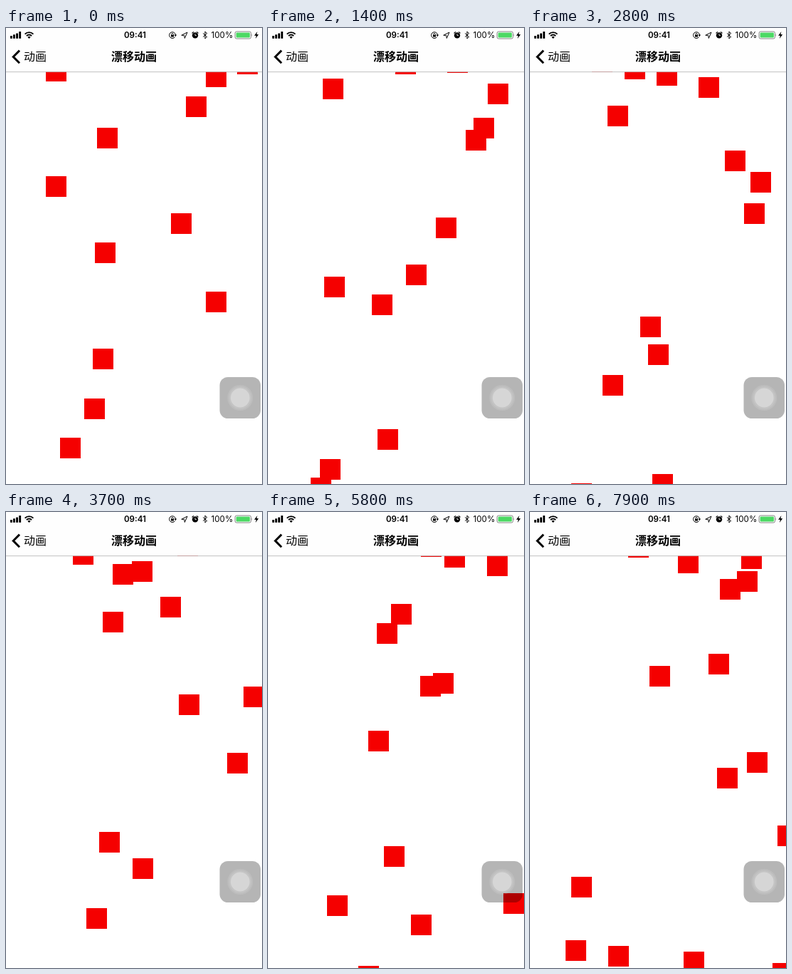
An HTML page that plays this animation: 360 by 640 pixels, repeating every 8000 ms.

```html
<!DOCTYPE html>
<html lang="zh">
<head>
<meta charset="utf-8">
<title>漂移动画</title>
<style>
html, body { margin: 0; width: 100%; height: 100%; overflow: hidden; background: #fff; }
svg { display: block; width: 360px; height: 640px; }
.cjk { font: 16px "Noto Sans CJK SC", "Noto Sans CJK", sans-serif; }
.status { font: 11.6px Inter, "Liberation Sans", sans-serif; }
.title { font-weight: 700; }
.clock { font-weight: 600; }
</style>
</head>
<body>
<svg viewBox="0 0 360 640" xmlns="http://www.w3.org/2000/svg">
  <rect width="360" height="640" fill="#fff"/>
  <g id="drift" fill="#f50000"></g>

  <!-- floating button -->
  <rect x="300.5" y="490" width="57.5" height="58" rx="11.5" fill="#000" fill-opacity=".29"/>
  <g fill="#fff" transform="translate(329.3 519)">
    <circle r="18" fill-opacity=".1"/>
    <circle r="15.8" fill-opacity=".1"/>
    <circle r="13.4" fill-opacity=".3"/>
  </g>

  <!-- navigation bar -->
  <rect width="360" height="61.5" fill="#fefefe"/>
  <rect y="61.3" width="360" height=".8" fill="#b4b4b4"/>
  <path d="M19 31.6 10.2 40.4 19 49.2" fill="none" stroke="#000" stroke-width="2.9"/>
  <text class="cjk" x="25" y="46.4">动画</text>
  <text class="cjk title" x="180" y="46.4" text-anchor="middle">漂移动画</text>

  <!-- status bar -->
  <path d="M6 11h2.9v3.8H6zM10 9.3h2.9v5.5H10zM14.1 7.4H17v7.4h-2.9zM18.2 5h2.9v9.8h-2.9z"/>
  <g fill="none" stroke="#000" stroke-width="1.9">
    <path d="M26.6 8.6a8.2 8.2 0 0 1 11.8 0"/>
    <path d="M28.9 11a5 5 0 0 1 7.2 0"/>
  </g>
  <path d="M32.5 15l-2.1-2.2a3 3 0 0 1 4.2 0z"/>
  <text class="status clock" x="181.4" y="14" text-anchor="middle">09:41</text>
  <g fill="none" stroke="#000">
    <path d="M237.6 12.6a4.4 4.4 0 1 1 .8-2.4"/>
    <path d="M232.7 9.6V8.7a1.3 1.3 0 0 1 2.6 0v.9" stroke-width=".8"/>
    <path d="M246.8 10.2 255 6l-3.7 8.4-.7-4.1z"/>
    <path d="M277 7.4l5.6 5-2.7 2.5V5l2.7 2.5-5.6 5"/>
  </g>
  <path d="M232 9.4h4v3.2h-4zM236.4 9.6h3.8l-1.9 2.5z"/>
  <circle cx="266" cy="10.4" r="4.2"/>
  <path d="M262 7l1.6-1.4M270 7l-1.6-1.4" stroke="#000" stroke-width="1.2" stroke-linecap="round"/>
  <path d="M266 8v2.6h2" fill="none" stroke="#fff" stroke-width=".8"/>
  <text class="status" x="288.6" y="14">100%</text>
  <rect x="322.1" y="5" width="22.4" height="10" rx="2.2" fill="#fff" stroke="#777" stroke-width=".9"/>
  <rect x="323.6" y="6.5" width="19.4" height="7" rx="1" fill="#4cd964"/>
  <path d="M345.6 8.3q1.5 1.7 0 3.4z" fill="#777"/>
  <path d="M353.4 5l-4.3 5.7h2.8l-1 4.3 4.3-5.9h-2.8z"/>
</svg>
<script>
const LOOP = 8000, STEP = 100;
const SIZE = 29, TOP = 32.6, BOTTOM = 640;
const FIRST = -9.32, GAP = 0.8, FAST = 10, SLOW = 20; // seconds

// A square leaves the top every GAP and eases along a straight line.
// Key points of each line: x at the top, x at the bottom.
const lines = [
  [47, 223], [354, 29], [234, 57], [323, 58], [3, 176], [45, 470],
  [218, 549], [27, 127], [36, 557], [44, 565], [279, 342], [326, 99],
  [179, 142], [252, 6], [128, 455], [87, 414], [241, 497], [320, 67],
  [215, 30], [299, 204], [301, 149], [138, 138]
];
const slow = [0, 1, 6, 9, 12, 16, 18];

const layer = document.getElementById("drift");
const squares = lines.map(([from, to], i) => {
  const node = document.createElementNS("http://www.w3.org/2000/svg", "rect");
  node.setAttribute("width", SIZE);
  node.setAttribute("height", SIZE);
  layer.appendChild(node);
  const duration = slow.includes(i) ? SLOW : FAST;
  return { node, from, to, duration, born: FIRST + GAP * i };
});

const mix = (a, b, p) => Math.round(a + (b - a) * p);

// cubic-bezier(.42, 0, .58, 1), solved with Newton steps
function easeInOut(x) {
  let s = x;
  for (let i = 0; i < 6; i++) {
    const error = ((0.52 * s - 0.78) * s + 1.26) * s - x;
    s -= error / ((1.56 * s - 1.56) * s + 1.26);
  }
  return s * s * (3 - 2 * s);
}

function draw(ms) {
  const t = Math.floor((ms % LOOP) / STEP) * STEP / 1000;
  for (const { node, from, to, duration, born } of squares) {
    const progress = (t - born) / duration;
    const falling = progress >= 0 && progress < 1;
    node.setAttribute("visibility", falling ? "visible" : "hidden");
    if (!falling) continue;
    const p = easeInOut(progress);
    node.setAttribute("x", mix(from, to, p));
    node.setAttribute("y", mix(TOP, BOTTOM, p));
  }
}

const start = performance.now();
function tick() {
  draw(performance.now() - start);
  requestAnimationFrame(tick);
}
draw(0);
requestAnimationFrame(tick);
</script>
</body>
</html>
```
